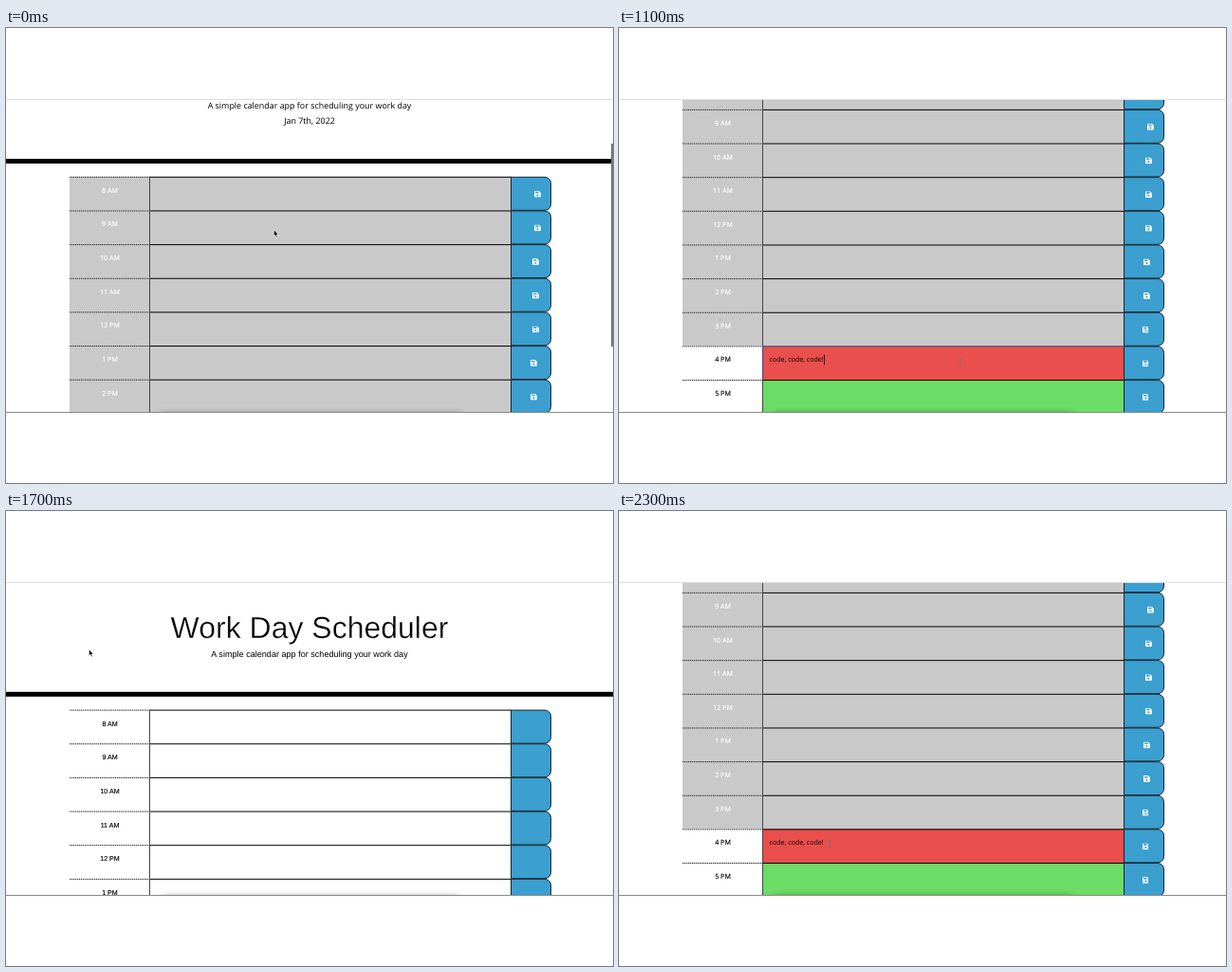
Write an HTML page that moves like this. It is 640x480 px and loops after 2400 ms.

```html
<!DOCTYPE html>
<html lang="en">
<head>
<meta charset="utf-8">
<title>Work Day Scheduler</title>
<style>
html, body { margin: 0; width: 100%; height: 100%; overflow: hidden; background: #fff; }
#stage { position: relative; width: 640px; height: 480px; overflow: hidden; background: #fff; }
#stage div, #stage span, #stage svg { position: absolute; box-sizing: border-box; }
#view { left: 0; top: 76px; width: 640px; height: 329px; overflow: hidden; }
.edge { left: 0; width: 640px; height: 1px; }
#page {
  left: 0; top: 0; width: 640px; height: 0; color: #000;
  font: 7.13px/12px "Open Sans", sans-serif; text-rendering: geometricPrecision;
}
.head { left: 0; width: 640px; height: 0; line-height: 0; text-align: center; white-space: nowrap; font-size: 8.91px; }
.title { top: -103px; font-size: 32px; font-weight: 300; }
.sub { top: -75px; }
.date { top: -59px; }
.bar { left: 0; top: 0; width: 640px; height: 5px; background: #000; transform: translateY(-18.8px); }

.row { left: 67px; top: 0; width: 508px; height: 36px; }
.hour {
  left: 0; top: 0; width: 85px; height: 100%; padding-top: 9px; text-align: center;
  background: #fff; -webkit-text-stroke: .15px currentColor;
}
.hour::before {
  content: ""; position: absolute; left: 0; top: 0; width: 100%; height: 1px;
  background: repeating-linear-gradient(90deg, #222 0 1px, #8888 1px 2px);
}
.note {
  left: 84px; top: 0; width: 382px; height: 100%; white-space: pre; background: #fff;
  border-left: 1px solid #444; border-top: 1px solid #000;
}
.row:last-child .note { border-bottom: 1px solid #000; }
.note span { left: 6.5px; top: 8px; }
.save {
  left: 465px; top: 0; width: 43px; height: 100%; background: #3b9fcf;
  border: 1px solid #17242c; border-radius: 0 7px 7px 0;
}
.save svg { top: 13.8px; width: 6.8px; height: 6.8px; fill: #fff; }
.past .hour, .past .note { background-color: #c9c9c9; }
.past .hour { color: #fff; }
.present .note { background: #e94f4c; }
.future .note { background: #6bdc66; }
.row.typing .note { border-color: #3a4694; }
.row.typing .note span { border-right: 1px solid #222; height: 11px; }
.row.saved .save { outline: 1px solid #62aef2; outline-offset: -1px; border-radius: 2px; }

.raw { font-family: "Liberation Sans", Arial, sans-serif !important; }
.raw .title { top: -87px; font-weight: 400; -webkit-text-stroke: .4px #fff; }
.raw .sub { top: -59px; font-size: 9.08px; }
.raw .date, .raw .save svg { display: none; }
.raw .hour { color: #000; }
#stage .raw .hour, #stage .raw .note { background-color: #fff; }

#dock { left: 164px; top: 331px; width: 314px; height: 20px; box-shadow: 0 0 7px rgba(0,0,0,.45); }
#thumb { left: 638px; width: 2px; height: 214px; background: #777; }
#mouse { left: 0; top: 0; width: 8px; height: 10px; overflow: visible; }
</style>
</head>
<body>
<div id="stage">
  <div id="view">
    <div id="page">
      <div class="head title">Work Day Scheduler</div>
      <div class="head sub">A simple calendar app for scheduling your work day</div>
      <div class="head date">Jan 7th, 2022</div>
      <div class="bar"></div>
    </div>
    <div id="dock"></div>
  </div>
  <div class="edge" style="top:75px;background:#dedede"></div>
  <div class="edge" style="top:405px;background:#8a8a8a"></div>
  <div id="thumb"></div>
  <svg id="mouse" viewBox="0 0 8 10">
    <path id="arrow" d="M0 0V6.6L1.5 5.3L2.6 7.8L3.7 7.3L2.6 4.9H4.6Z" fill="#000" stroke="#fff" stroke-width=".5"/>
    <path id="beam" d="M-1.5-3.5Q0-3.5 0-2.5Q0-3.5 1.5-3.5M0-2.5V3M-1.5 4Q0 4 0 3Q0 4 1.5 4" fill="none" stroke="#777" stroke-width=".9"/>
  </svg>
</div>
<script>
const TICK = 100, TICKS = 24, PITCH = 35.65, VIEW_TOP = 76;
const NOTE = "code, code, code!";
const hours = ["8 AM", "9 AM", "10 AM", "11 AM", "12 PM", "1 PM", "2 PM", "3 PM", "4 PM", "5 PM"];
const iconX = [24.5, 24.5, 22.6, 22.6, 22.6, 20.7, 20.7, 19, 19, 19];
const NOW = 8;

// tick, y of the first row
const scroll = [[0, 156.8], [2, 47.2], [3, 47.2], [4, 50.2], [13, 50.2], [14, 53.7], [16, 53.7],
  [17, 209.6], [18, 228.6], [19, 99.3], [20, 61.5], [21, 50.2], [23, 50.2]];
// tick, x, y
const path = [[0, 282.5, 213], [2, 218.5, 298], [4, 190, 350], [11, 360, 352], [12, 555, 354],
  [13, 555, 356], [14, 240, 220], [15, 87.5, 146], [20, 87.5, 146], [22, 200, 330], [23, 222, 351]];

const $ = id => document.getElementById(id);
const page = $("page"), mouse = $("mouse"), thumb = $("thumb");

const icon = x => `<svg viewBox="0 0 14 14" style="left:${x - .3}px"><path fill-rule="evenodd"
  d="M1.5 0H10L14 4V12.5Q14 14 12.5 14H1.5Q0 14 0 12.5V1.5Q0 0 1.5 0ZM2 2V5.2H9.5V2ZM7 7.3A2.2 2.2 0 1 0 7 11.7A2.2 2.2 0 1 0 7 7.3Z"/></svg>`;

const rows = hours.map((hour, i) => {
  const row = document.createElement("div");
  row.className = "row " + (i < NOW ? "past" : i > NOW ? "future" : "present");
  row.style.transform = `translateY(${i * PITCH}px)`;
  row.innerHTML = `<div class="hour">${hour}</div><div class="note"><span></span></div>
    <div class="save">${icon(iconX[i])}</div>`;
  page.append(row);
  return row;
});
const current = rows[NOW], note = current.querySelector("span");

function at(keys, t) {
  let i = keys.length - 1;
  while (keys[i][0] > t) i--;
  const a = keys[i], b = keys[i + 1] || a;
  const k = b === a ? 0 : (t - a[0]) / (b[0] - a[0]);
  return a.slice(1).map((v, j) => v + (b[j + 1] - v) * k);
}

const show = (el, on) => { el.style.visibility = on ? "visible" : "hidden"; };

function draw(t) {
  const [top] = at(scroll, t), [x, y] = at(path, t);
  const typing = t >= 4 && t < 13, loading = t === 17;
  page.style.transform = `translateY(${top - VIEW_TOP}px)`;
  page.classList.toggle("raw", loading);
  current.classList.toggle("typing", typing);
  current.classList.toggle("saved", t >= 13 && t < 17);

  const typed = Math.min(NOTE.length, Math.max(0, (t - 6) * 3 + 2));
  note.textContent = loading ? "" : NOTE.slice(0, typed);

  const beam = t === 4 || t === 11 || t >= 22;
  const hidden = t > 4 && t < 11;
  mouse.style.transform = `translate(${x}px, ${y}px)`;
  show($("arrow"), !beam && !hidden);
  show($("beam"), beam);

  thumb.style.top = 122 + (156.8 - top) * .64 + "px";
  show(thumb, t < 4 || (t > 17 && t < 22));
}

function frame() {
  draw(Math.floor(performance.now() / TICK) % TICKS);
  requestAnimationFrame(frame);
}
frame();
</script>
</body>
</html>
```
